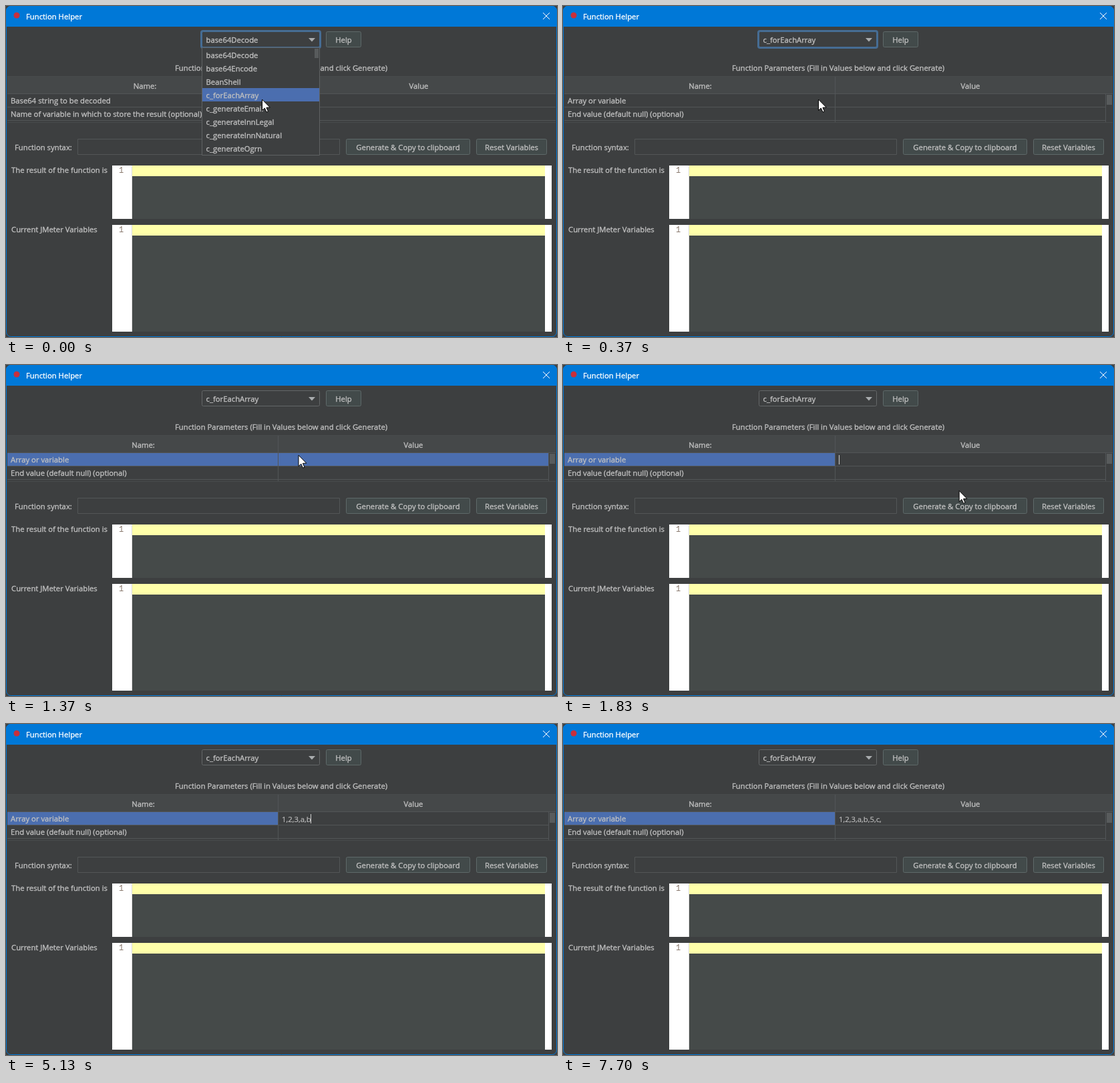
Animation of 825x496 px, one loop 8 s. Source, as an HTML page with a canvas:

```html
<!DOCTYPE html>
<html lang="en">
<head>
<meta charset="utf-8">
<title>Function Helper</title>
<style>
  html, body { margin: 0; width: 100%; height: 100%; overflow: hidden; background: #3d3f40; }
  canvas { display: block; }
</style>
</head>
<body>
<canvas id="stage" width="825" height="496"></canvas>
<script>
const ctx = document.getElementById('stage').getContext('2d');
const LOOP = 8000;
const FONT = '11.3px "Open Sans", "Noto Sans", sans-serif';
const C = {
  panel: '#3d3f40', field: '#454a49', header: '#454849', line: '#525557', edge: '#484b4c',
  border: '#646768', text: '#c0c0c0', blue: '#0078d7', select: '#4b6eaf', ring: '#466d94',
  thumb: '#585b5c', yellow: '#ffffaa'
};

const FUNCTIONS = ['base64Decode', 'base64Encode', 'BeanShell', 'c_forEachArray', 'c_generateEmail',
  'c_generateInnLegal', 'c_generateInnNatural', 'c_generateOgrn'];

// Moments in ms
const RESIZE = 330, CHOSEN = 370, SELECT = 1370, EDIT = 1530;
const TYPED = '1,2,3,a,b,5,c,';
const KEYS = [2670, 2930, 3070, 3570, 3870, 4500, 4670, 4930, 5130, 5470, 6200, 6470, 6830, 7200];
const BLINK = 500;

function rect(x, y, w, h, fill) {
  ctx.fillStyle = fill;
  ctx.fillRect(x, y, w, h);
}

function box(x, y, w, h, fill, stroke, radius = 0) {
  ctx.beginPath();
  ctx.roundRect(x + .5, y + .5, w - 1, h - 1, radius);
  ctx.fillStyle = fill;
  ctx.fill();
  ctx.lineWidth = 1;
  ctx.strokeStyle = stroke;
  ctx.stroke();
}

// A hairline stroke gives the letters a medium weight at regular width.
function text(s, x, y, { align = 'left', color = C.text, font = FONT, weight = .35 } = {}) {
  ctx.font = font;
  ctx.textAlign = align;
  ctx.fillStyle = ctx.strokeStyle = color;
  ctx.lineWidth = weight;
  ctx.lineJoin = 'round';
  ctx.fillText(s, x, y);
  if (weight) ctx.strokeText(s, x, y);
}

function centered(s, x, y) {
  text(s, x, y, { align: 'center' });
}

function button(label, x, y, w) {
  box(x, y, w, 24, '#424a4a', '#5e6969', 2);
  centered(label, x + w / 2, y + 17);
}

function polygon(points, fill, stroke) {
  ctx.beginPath();
  points.forEach(([x, y]) => ctx.lineTo(x, y));
  ctx.closePath();
  ctx.fillStyle = fill;
  ctx.fill();
  if (stroke) {
    ctx.strokeStyle = stroke;
    ctx.lineWidth = 1;
    ctx.stroke();
  }
}

function drawBackdrop(windowHeight) {
  rect(0, 0, 825, 496, C.panel);
  for (let x = 51; x < 825; x += 132) rect(x, 0, 1, 496, '#4b4d4e');
  const shadow = ctx.createLinearGradient(0, windowHeight, 0, windowHeight + 42);
  shadow.addColorStop(0, 'rgba(0,0,0,.36)');
  shadow.addColorStop(.4, 'rgba(0,0,0,.14)');
  shadow.addColorStop(1, 'rgba(0,0,0,0)');
  rect(0, windowHeight, 825, 42, shadow);
}

function drawTitleBar() {
  rect(0, 0, 825, 31, C.blue);
  ctx.beginPath();
  ctx.arc(16, 14, 4.5, 0, 7);
  ctx.fillStyle = '#c9303c';
  ctx.fill();
  text('Function Helper', 30, 20, { color: '#fff' });
  ctx.beginPath();
  ctx.moveTo(804, 10); ctx.lineTo(814, 20);
  ctx.moveTo(814, 10); ctx.lineTo(804, 20);
  ctx.strokeStyle = '#fff';
  ctx.lineWidth = 1;
  ctx.stroke();
}

function drawCombo(value, focused) {
  if (focused) {
    ctx.beginPath();
    ctx.roundRect(291, 36, 181, 28, 4);
    ctx.fillStyle = C.ring;
    ctx.fill();
  }
  box(293, 38, 177, 24, C.panel, focused ? C.ring : C.border, 2);
  polygon([[453, 48], [463, 48], [458, 53.5]], '#a9acae');
  text(value, 299.5, 55);
}

function drawPopup() {
  box(293, 62, 177, 162, C.panel, '#5f6263');
  rect(294, 123, 175, 20, C.select);
  FUNCTIONS.forEach((name, i) => text(name, 299.5, 78 + 20 * i));
  rect(462, 64, 6, 14, C.thumb);
}

function drawTable(t) {
  const scrolls = t >= CHOSEN;
  const split = scrolls ? 407 : 412, right = scrolls ? 812 : 823;
  const rows = scrolls
    ? ['Array or variable', 'End value (default null) (optional)']
    : ['Base64 string to be decoded', 'Name of variable in which to store the result (optional)'];

  rect(2, 106, 821, 25, C.header);
  rect(2, 105, 821, 1, C.edge);
  rect(2, 131, 821, 1, C.line);
  if (t >= SELECT) rect(2, 132, (t < EDIT ? right : split) - 2, 19, C.select);
  rows.forEach((label, i) => {
    rect(2, 151 + 20 * i, right - 2, 1, C.line);
    text(label, 7, 146 + 20 * i);
  });
  rect(split, 106, 1, 68, C.line);
  rect(2, 174, 821, 1, C.edge);
  centered('Name:', (2 + split) / 2 + 1, 124);
  centered('Value', (split + right) / 2 + .5, 124);
  if (scrolls) {
    rect(812, 132, 1, 42, C.line);
    rect(814, 133, 8, 15, C.thumb);
  }
}

function drawEditor(t) {
  if (t < EDIT) return;
  const count = KEYS.filter(k => k <= t).length;
  const value = TYPED.slice(0, count);
  text(value, 413, 147, { weight: .15 });
  // Every key press restarts the blinking.
  const since = t - (count ? KEYS[count - 1] : EDIT);
  if (Math.floor(since / BLINK) % 2 === 0) {
    rect(413 + Math.floor(ctx.measureText(value).width), 135, 1, 14, '#d0d0d0');
  }
}

function drawCodeArea(label, y, h) {
  text(label, 8, y + 11);
  rect(159, y, 658, h, '#fff');
  rect(188, y, 1, h, '#ddd');
  rect(189, y, 618, h, C.field);
  rect(189, y, 618, 16, C.yellow);
  text('1', 172.5, y + 11, {
    align: 'center', color: '#857468', font: '12px "Liberation Mono", monospace', weight: 0
  });
}

function pointerAt(t) {
  if (t < RESIZE) return [383.5, 140];
  if (t < SELECT) {
    const u = Math.min(1, Math.max(0, (t - 630) / 570));
    const eased = 1 - (1 - u) ** 2.43;
    return [382.5 + 55.5 * eased, 140 - 4.8 * eased];
  }
  if (t >= 2000) return null;
  const u = Math.max(0, t - EDIT) / 300;
  const k = u ** 1.3;
  return [438 + 154.5 * k, 135.2 + 53 * k];
}

function drawPointer(t) {
  const tip = pointerAt(t);
  if (!tip) return;
  const shape = [[0, 0], [0, 16.5], [3.8, 13], [6.5, 19], [9, 18], [6.4, 12.2], [11.8, 12]];
  polygon(shape.map(([x, y]) => [tip[0] + x, tip[1] + y]), '#fff', '#000');
}

function draw(t) {
  const height = t >= RESIZE && t < CHOSEN ? 400 : 496;
  drawBackdrop(height);
  ctx.save();
  ctx.beginPath();
  ctx.roundRect(0, 0, 825, height, 7);
  ctx.clip();
  rect(0, 0, 825, height, C.panel);
  drawTitleBar();
  centered('Function Parameters (Fill in Values below and click Generate)', 412, 97);
  drawTable(t);
  drawEditor(t);
  text('Function syntax:', 13, 216);
  box(107, 199, 393, 24, C.panel, '#535657');
  button('Help', 479, 38, 53);
  button('Generate & Copy to clipboard', 509, 199, 186);
  button('Reset Variables', 704, 199, 106);
  drawCodeArea('The result of the function is', 239, 80);
  drawCodeArea('Current JMeter Variables', 328, 160);
  drawCombo(FUNCTIONS[t < CHOSEN ? 0 : 3], t < SELECT);
  if (t < CHOSEN) drawPopup();
  ctx.restore();

  ctx.beginPath();
  ctx.roundRect(.5, .5, 824, height - 1, 7);
  ctx.strokeStyle = C.blue;
  ctx.lineWidth = 1;
  ctx.stroke();
  drawPointer(t);
}

const start = performance.now();
function frame() {
  draw((performance.now() - start) % LOOP);
  requestAnimationFrame(frame);
}
frame();
</script>
</body>
</html>
```
